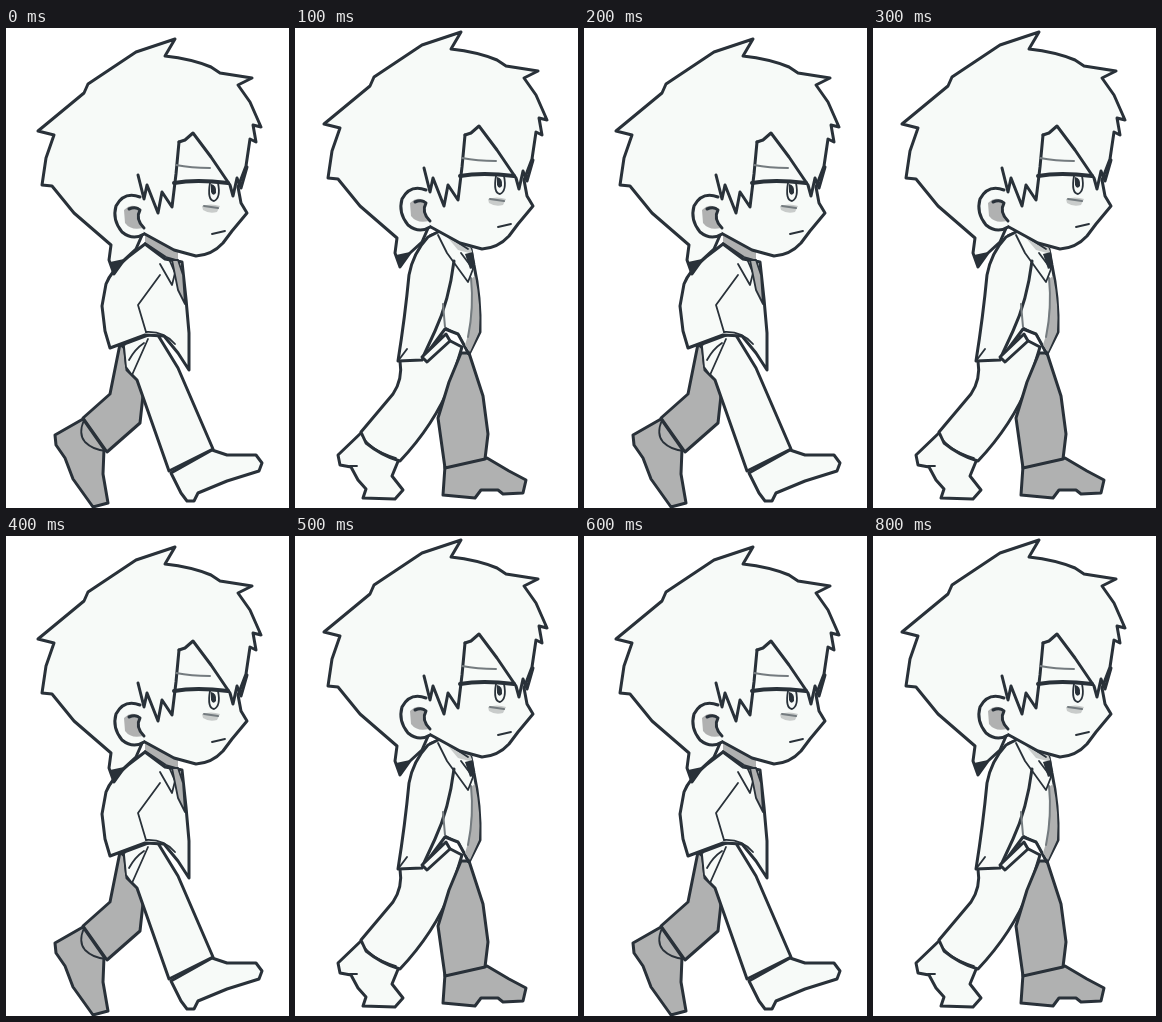
Recreate the animation shown at these times as an HTML page. Size 283x480 px, loop 1000 ms.

```html
<!DOCTYPE html>
<html lang="en">
<head>
<meta charset="utf-8">
<title>Walk cycle</title>
<style>
html, body { margin: 0; width: 100%; height: 100%; overflow: hidden; background: #fff; }
svg { display: block; width: 100vw; height: 100vh; }
path { fill: none; stroke: #293139; stroke-width: 3; stroke-linejoin: round; stroke-linecap: round; }
.white { fill: #f7faf8; }
.grey { fill: #b0b1b1; }
.shade { fill: #b0b1b1; stroke: none; }
.soft { fill: #c9cccb; stroke: none; }
.fine { stroke-width: 1.8; }
.pale { stroke: #747b7f; stroke-width: 2; }
.bold { stroke-width: 4; }
.dark { fill: #293139; stroke: none; }
</style>
</head>
<body>
<svg id="stage" viewBox="0 0 283 480"></svg>
<script>
// Each part is [style, path], painted back to front.
const head = [
  ['white', 'M78 65 L82 56 L106 40 L130 24 L169 11 L159 28 Q186 31 205 39 L214 45 L246 50 L232 57 L244 74 L255 99 L247 97 L250 114 L244 111 L240 138 L232 159 L235 175 L241 185 L226 203 L217 215 Q206 227 190 228 L168 222 L137 205 L130 221 L118 232 L108 246 L103 232 L105 217 L68 185 L46 158 L36 157 L40 130 L48 107 L32 103Z'],
  ['dark', 'M104 234 L118 231 L109 246Z'],
  // ear
  ['white', 'M134 169 Q118 163 110 178 Q106 192 116 204 Q127 213 138 206'],
  ['shade', 'M118 182 Q126 174 135 181 Q130 190 137 200 Q125 203 119 195Z'],
  ['', 'M123 181 Q130 178 134 182 Q129 191 138 200'],
  // fringe
  ['', 'M132 147 L138 171 L141 157 L152 185 L156 164 L166 179 L170 146 L173 114'],
  ['', 'M173 114 L179 112 L187 105 L205 129 L224 157 L227 168 L231 150 L235 160 L241 139'],
  ['pale', 'M170 137 Q185 140 204 140'],
  // face
  ['bold', 'M168 155 Q190 151 222 155'],
  ['fine', 'M204 155 Q201 172 208 173 Q215 170 212 155'],
  ['dark', 'M205 156 Q211 157 210 165 Q207 169 205 164Z'],
  ['soft', 'M196 178 Q205 175 214 178 L211 184 Q203 186 197 182Z'],
  ['pale', 'M198 178 L212 180'],
  ['fine', 'M206 206 L219 203']
];

const stride = [
  // rear leg and shoe
  ['grey', 'M114 316 L104 366 L77 390 L101 424 L134 395 L140 340Z'],
  ['grey', 'M77 391 L49 407 L50 417 L59 430 L67 451 L87 479 L102 475 L97 446 L98 421Z'],
  ['fine', 'M78 392 Q72 406 79 414 Q87 422 100 423'],
  // front leg and shoe
  ['white', 'M165 445 L175 465 L181 473 L188 473 L192 465 L221 453 L253 443 L256 435 L250 427 L221 427 L206 422Z'],
  ['white', 'M118 316 L121 342 L131 352 L163 443 L207 421 L172 340 L150 304Z'],
  // neck, jacket and tie
  ['shade', 'M139 205 L172 221 L172 233 L160 231 L139 216Z'],
  ['white', 'M122 229 Q105 243 100 256 L96 278 L99 303 L104 320 L139 307 L158 308 L172 325 L183 342 L183 305 L180 271 L176 234 L159 231 L139 216Z'],
  ['fine', 'M139 215 L160 229 L174 233'],
  ['fine', 'M154 236 L166 257 L169 245 L163 231'],
  ['grey fine', 'M166 232 L172 232 L177 247 L179 276 L172 262 L169 247Z'],
  ['fine', 'M154 247 L132 277 L140 304'],
  ['fine', 'M140 304 Q158 303 169 316'],
  ['white fine', 'M118 318 L120 339 L126 347 L142 311'],
  ['fine', 'M123 332 Q129 321 138 315']
];

const passing = [
  // rear leg and shoe
  ['white', 'M67 404 L43 427 L45 437 L56 439 L63 452 L71 461 L68 470 L100 471 L108 462 L97 448 L104 431Z'],
  ['white', 'M105 333 Q108 351 98 366 L66 404 L71 415 Q87 428 105 433 Q139 397 156 355 L167 319 L140 305Z'],
  ['fine', 'M66 405 Q72 421 101 430'],
  ['fine', 'M55 438 L62 438'],
  // front leg and shoe
  ['grey', 'M150 438 L148 467 L180 470 L186 462 L203 462 L208 466 L228 465 L231 452 L214 443 L192 430Z'],
  ['grey', 'M166 325 L154 354 L143 390 L150 440 L190 431 L193 406 L188 368 L174 325Z'],
  // jacket and tie
  ['white', 'M133 209 Q118 225 114 247 Q110 289 103 333 L127 332 L150 301 L163 306 L174 326 L185 304 Q186 270 179 237 L176 221 L145 203Z'],
  ['shade', 'M176 251 Q177 276 174 304 L170 317 L175 324 L184 304 Q186 277 180 248Z'],
  ['pale', 'M176 250 Q179 280 173 309'],
  ['soft', 'M148 204 L174 216 L178 226 L163 222Z'],
  ['fine', 'M135 207 L145 203 L173 221'],
  ['fine', 'M143 207 L152 225 L173 254 L178 241 L166 225'],
  ['dark', 'M170 226 L178 224 L180 238 L175 241Z'],
  ['', 'M159 233 Q154 273 140 303 L128 329'],
  ['pale', 'M148 276 L150 299'],
  ['white', 'M127 329 L151 306 L155 313 L132 334Z'],
  ['fine', 'M103 333 L112 321'],
  ['fine', 'M151 300 L164 307 L173 326']
];

const SVG = 'http://www.w3.org/2000/svg';
const stage = document.getElementById('stage');

function add(parent, tag, attrs = {}) {
  const node = document.createElementNS(SVG, tag);
  for (const key in attrs) node.setAttribute(key, attrs[key]);
  return parent.appendChild(node);
}

function paint(parent, parts) {
  parts.forEach(([style, d]) => add(parent, 'path', { class: style, d }));
}

// The head keeps its shape and bobs with the body.
function makePose(body, dx, dy) {
  const group = add(stage, 'g');
  paint(group, body);
  paint(add(group, 'g', { transform: `translate(${dx} ${dy})` }), head);
  return group;
}

const poses = [makePose(stride, 0, 0), makePose(passing, -3, -7)];

// The pose alternates at every change; the last two steps are held longer.
const LOOP = 1000;
const changes = [100, 200, 300, 400, 500, 600, 800];
const start = performance.now();

function draw() {
  const t = (performance.now() - start) % LOOP;
  const pose = changes.filter(at => at <= t).length % 2;
  poses.forEach((group, i) => { group.style.display = i === pose ? '' : 'none'; });
  requestAnimationFrame(draw);
}
draw();
</script>
</body>
</html>
```
